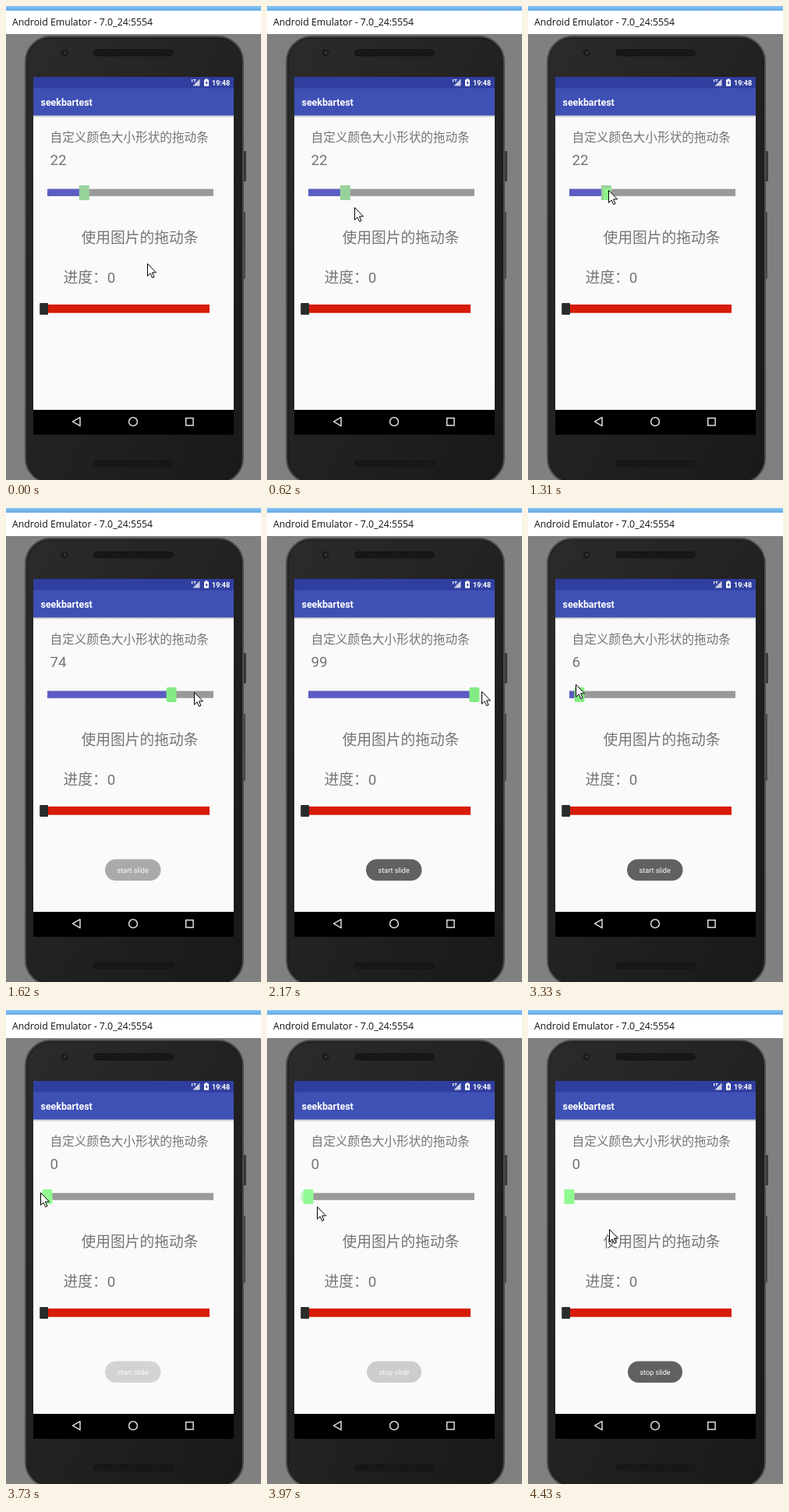
An HTML page that plays this animation: 327x608 px, repeating every 4660 ms.

```html
<!DOCTYPE html>
<html lang="zh-CN">
<head>
<meta charset="utf-8">
<title>seekbartest</title>
<style>
  html, body { margin: 0; width: 100%; height: 100%; overflow: hidden; background: #808080; }
  svg { display: block; }
  text { font-family: Roboto, "Noto Sans CJK SC", "Noto Sans CJK", sans-serif; }
  .label { fill: #757575; font-size: 18.75px; }
  .white { fill: #fff; }
  .toast text { fill: #fff; font-size: 9.1px; text-anchor: middle; }
</style>
</head>
<body>
<svg width="327" height="608" viewBox="0 0 327 608">
  <defs>
    <linearGradient id="strip" x2="0" y2="1">
      <stop offset="0" stop-color="#8cc4f2"/>
      <stop offset="1" stop-color="#62a8e6"/>
    </linearGradient>
    <linearGradient id="body" y2="1">
      <stop offset="0" stop-color="#2b2b2b"/>
      <stop offset=".5" stop-color="#222"/>
      <stop offset="1" stop-color="#191919"/>
    </linearGradient>
    <linearGradient id="shade" x2="0" y2="1">
      <stop offset="0" stop-color="#000" stop-opacity=".22"/>
      <stop offset="1" stop-color="#000" stop-opacity="0"/>
    </linearGradient>
    <pattern id="mesh" width="3" height="3" patternUnits="userSpaceOnUse">
      <rect width="3" height="3" fill="#141414"/>
      <circle cx="1.5" cy="1.5" r=".7" fill="#262626"/>
    </pattern>
  </defs>

  <!-- window -->
  <rect width="327" height="608" fill="#808080"/>
  <rect width="327" height="36" fill="#fff"/>
  <rect width="327" height="6" fill="url(#strip)"/>
  <text x="8" y="25" style="font:12.3px 'Open Sans',sans-serif" fill="#111">Android Emulator - 7.0_24:5554</text>

  <!-- phone -->
  <rect x="304" y="186" width="4" height="39" rx="1" fill="#3a3a3a"/>
  <rect x="304" y="264" width="3" height="86" rx="1" fill="#4a4a4a"/>
  <rect x="25" y="39" width="279" height="573" rx="32" fill="url(#body)" stroke="#4c4c4c" stroke-width="2"/>
  <rect x="27" y="41" width="275" height="569" rx="30" fill="none" stroke="#1c1c1c"/>
  <circle cx="75" cy="60" r="4.5" fill="#191919"/>
  <circle cx="75.5" cy="60" r="2" fill="#333"/>
  <g fill="url(#mesh)" stroke="#151515">
    <rect x="112.5" y="56" width="102" height="8" rx="4"/>
    <rect x="112.5" y="583" width="102" height="8" rx="4"/>
  </g>

  <!-- screen -->
  <rect x="35" y="91" width="257" height="459" fill="#fafafa"/>
  <rect x="35" y="91" width="257" height="15" fill="#303f9f"/>
  <rect x="35" y="105.5" width="257" height="35" fill="#3f51b5"/>
  <rect x="35" y="140.5" width="257" height="3" fill="url(#shade)"/>
  <text class="white" x="44.5" y="128" font-size="12.4" font-weight="700">seekbartest</text>
  <g class="white">
    <path d="M248.5 93.5v9h-9z" opacity=".75"/>
    <path d="M238 94h1.2v3.4h-1.2zM240.5 94h3v1h-3zM241.5 95h1v2.4h-1z"/>
    <path d="M254 94.5h1.7v-1.2h2.6v1.2h1.7v8.2h-6z"/>
    <path d="M257.5 95.5l-2 3.5h1.4v2.5l2-3.5h-1.4z" fill="#303f9f"/>
    <text x="264" y="101.7" font-size="9" font-weight="700">19:48</text>
  </g>
  <rect x="35" y="518" width="257" height="32" fill="#000"/>
  <g fill="none" stroke="#ddd" stroke-width="1.5">
    <path d="M85.5 533.2l9.5-5.5v11z" stroke-linejoin="round"/>
    <circle cx="163" cy="533.2" r="5.4"/>
    <rect x="230.7" y="528.6" width="9.4" height="9.4"/>
  </g>

  <text class="label" x="56.5" y="174" style="font-size:15.65px">自定义颜色大小形状的拖动条</text>
  <text class="label" id="count" x="56.5" y="203.7">22</text>
  <text class="label" x="96.5" y="304">使用图片的拖动条</text>
  <text class="label" x="73.5" y="355">进度：0</text>

  <rect x="53" y="234.7" width="213" height="9.1" fill="#999"/>
  <rect id="fill" x="53" y="234.7" height="9.1" fill="#5b5cc4"/>
  <ellipse id="halo" cx="50" cy="239.5" rx="7.5" ry="8" fill="#cdf5cd"/>
  <rect id="thumb" y="230" width="13" height="19"/>
  <rect id="press" x="97" y="234" width="9.6" height="15" fill="#90f58c"/>

  <rect x="44" y="382.9" width="217" height="10.8" fill="#d61b08"/>
  <rect x="43.2" y="381" width="10.8" height="15" rx="1" fill="#282c2b"/>

  <g class="toast" id="start">
    <rect x="127" y="450.5" width="71.5" height="27.5" rx="13.7" fill="#616161"/>
    <text x="162.7" y="468">start slide</text>
  </g>
  <g class="toast" id="stop">
    <rect x="128" y="450.5" width="70" height="27.5" rx="13.7" fill="#616161"/>
    <text x="163" y="468">stop slide</text>
  </g>
  <path id="cursor" d="M.5 .5V16.3L4.1 12.9 6.6 18.6 9 17.5 6.5 11.9H11.5Z" fill="#fff" stroke="#000"/>
</svg>

<script>
const LOOP = 4660, STEP = 77, TOUCH_LAG = 65;
const PRESS = 1070, DRAG = 1380, RELEASE = 3480;

const linear = p => p;
const easeIn = p => p * p;
const easeOut = p => 1 - (1 - p) ** 1.8;

// Pointer journey: each leg runs between two times and ends at x, y
const home = { x: 181, y: 330 };
const legs = [
  { from: 0,    to: 310,  x: 123, y: 300, ease: linear },
  { from: 400,  to: 770,  x: 104, y: 230, ease: linear },
  { from: 930,  to: 1080, x: 103, y: 236, ease: linear },
  { from: 1310, to: 1620, x: 241, y: 236, ease: linear },
  { from: 1620, to: 1770, x: 244, y: 236, ease: linear },
  { from: 1850, to: 2170, x: 275, y: 235, ease: linear },
  { from: 2790, to: 3330, x: 61,  y: 226, ease: easeOut },
  { from: 3330, to: RELEASE, x: 40, y: 231, ease: linear },
  { from: 3570, to: 4120, x: 87,  y: 273, ease: easeIn },
  { from: 4120, to: 4430, x: 104, y: 281, ease: easeOut }
];

const clamp = (v, lo, hi) => Math.min(hi, Math.max(lo, v));
const ramp = (t, from, to) => clamp((t - from) / (to - from), 0, 1);
const legAt = t => legs.findLastIndex(leg => t >= leg.from);

// The screen is refreshed in even steps while the pointer moves
function heldTime(t) {
  const { from, to } = legs[legAt(t)];
  const gap = (to - from) / Math.round((to - from) / STEP);
  return Math.min(to, from + gap * Math.floor((t - from) / gap + .08));
}

function pointer(t) {
  const i = legAt(t), leg = legs[i], start = legs[i - 1] || home;
  const p = leg.ease(ramp(t, leg.from, leg.to));
  return { x: start.x + (leg.x - start.x) * p, y: start.y + (leg.y - start.y) * p };
}

// The slider follows the pointer slightly late
function sliderValue(t) {
  if (t < DRAG) return 22;
  const { x } = pointer(Math.min(t - TOUCH_LAG, RELEASE));
  return clamp(Math.round((x - 53) / 2.15), 0, 99);
}

function thumbColor(t) {
  if (t < DRAG) return "#98d29b";
  return t < RELEASE + STEP ? "#84eb84" : "#92fa92";
}

function set(id, attrs) {
  const node = document.getElementById(id);
  for (const name in attrs) node.setAttribute(name, attrs[name]);
}

function render(time) {
  const t = heldTime(time);
  const { x, y } = pointer(t);
  const value = sliderValue(t);
  const length = value * 2.15;
  const glowing = t >= DRAG && t < 4190;

  set("cursor", { transform: `translate(${Math.round(x)} ${Math.round(y)})` });
  document.getElementById("count").textContent = value;
  set("fill", { width: Math.min(213, length) });
  set("thumb", { x: 46.5 + length, rx: glowing ? 2.5 : 0, fill: thumbColor(t) });
  set("press", { opacity: +(t >= PRESS && t < DRAG) });
  set("halo", { opacity: +(t > 3400 && t < 4110) });
  set("start", { opacity: ramp(t, 1470, 1760) * (1 - ramp(t, RELEASE, 3810)) });
  set("stop", { opacity: ramp(t, 3870, 4190) });
}

const origin = performance.now();
function tick() {
  render((performance.now() - origin) % LOOP);
  requestAnimationFrame(tick);
}
tick();
</script>
</body>
</html>
```
